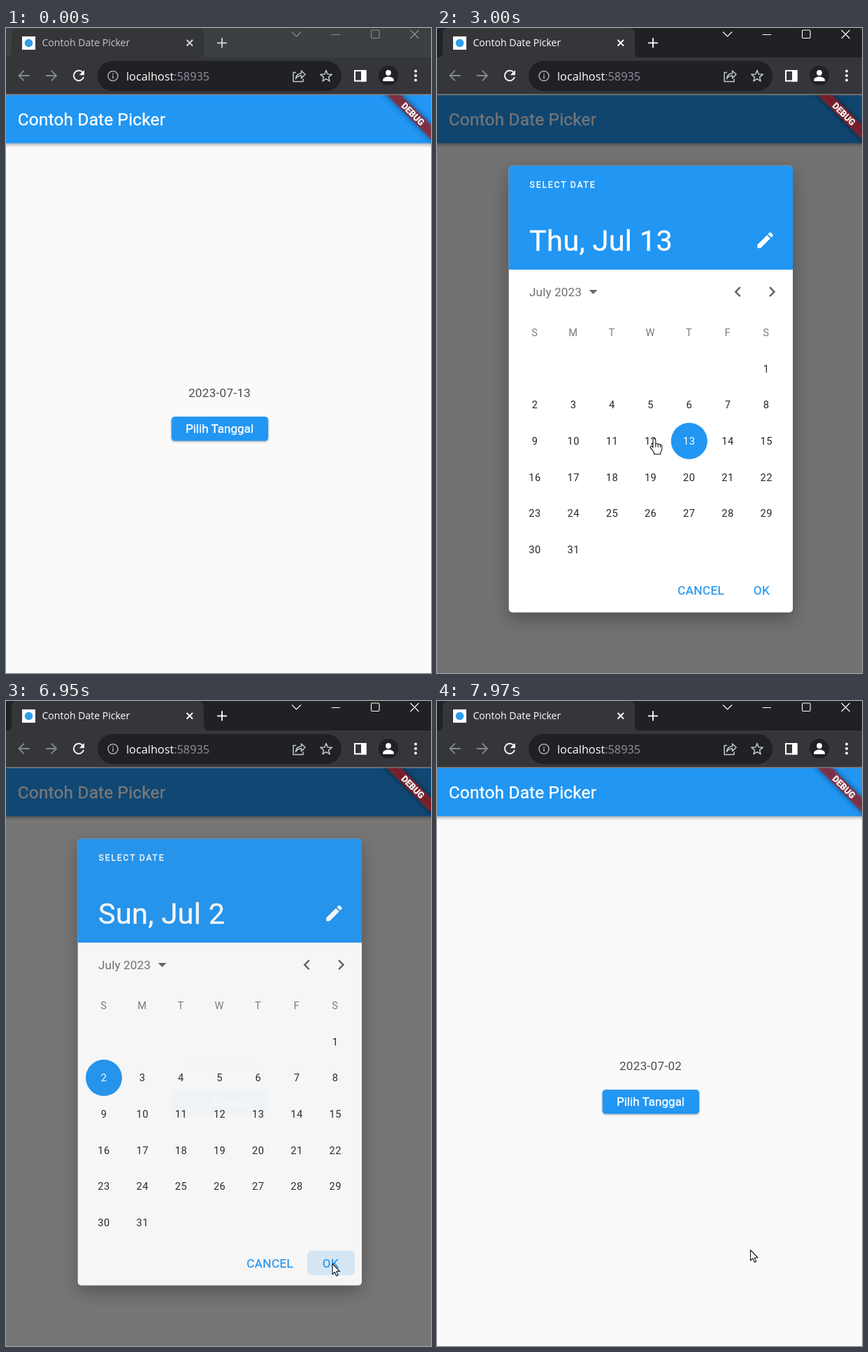
Write an HTML page that moves like this. It is 608 px wide and 921 px high and loops after 8 s.

```html
<!DOCTYPE html>
<html lang="id">
<head>
<meta charset="utf-8">
<title>Contoh Date Picker</title>
<style>
  html, body { margin: 0; width: 100%; height: 100%; overflow: hidden; background: #fafafa; }
  svg { display: block; width: 100%; height: 100%; }
  text { font-family: Roboto, sans-serif; font-size: 17.1px; white-space: pre; }
  .ui { font-family: "Open Sans", sans-serif; }
  .mid { text-anchor: middle; }
  .white { fill: #fff; stroke: #fff; stroke-width: .35; }
  .blue { fill: #2196f3; stroke: #2196f3; stroke-width: .25; }
  .line { fill: none; stroke-width: 1.8; }
  #days text { font-size: 14.6px; letter-spacing: .5px; }
  #week text { font-size: 14.6px; fill: #7c7c7c; }
  #appbar { filter: drop-shadow(0 2px 2.5px rgba(0,0,0,.35)); }
  #button { filter: drop-shadow(0 1.5px 1.5px rgba(0,0,0,.35)); }
  #card { filter: drop-shadow(0 9px 13px rgba(0,0,0,.3)); }
  #bandShade { filter: blur(4px); }
</style>
</head>
<body>
<svg viewBox="0 0 608 921" preserveAspectRatio="none">
  <defs><clipPath id="view"><rect y="95.5" width="608" height="826"/></clipPath></defs>

  <g id="page" clip-path="url(#view)">
    <rect y="95" width="608" height="826" fill="#fafafa"/>
    <rect id="appbar" x="-10" y="85" width="628" height="79.5" fill="#2196f3"/>
    <text class="white" x="16.8" y="139" style="font-size:24.4px" letter-spacing=".18">Contoh Date Picker</text>
    <text id="date" class="mid" x="305.6" y="527" fill="#4d4d4d" letter-spacing=".3">2023-07-13</text>
    <rect id="button" x="236.7" y="555" width="138.4" height="34.6" rx="4.8" fill="#2196f3"/>
    <text class="mid white" x="305.5" y="578.3">Pilih Tanggal</text>
  </g>

  <rect id="barrier" y="95.5" width="608" height="826" opacity="0"/>

  <g id="dialog">
    <rect id="card" x="102.7" y="196.7" width="406.3" height="637.8" rx="5" fill="#fff"/>
    <path d="M102.7 345V201.7a5 5 0 0 1 5-5H504a5 5 0 0 1 5 5V345z" fill="#2196f3"/>
    <text class="white" x="132.6" y="228" style="font-size:12.2px" letter-spacing="1.83">SELECT DATE</text>
    <text id="headline" class="white" x="132" y="318" style="font-size:41.5px" letter-spacing=".3">Thu, Jul 13</text>
    <path transform="translate(454.5 288) scale(1.25)" fill="#fff" d="M3 17.25V21h3.75L17.81 9.94l-3.75-3.75zM20.71 7.04a1 1 0 0 0 0-1.41l-2.34-2.34a1 1 0 0 0-1.41 0l-1.83 1.83 3.75 3.75z"/>
    <text x="132" y="383" fill="#707070" letter-spacing=".15">July 2023</text>
    <path d="M217.5 374h12l-6 6z" fill="#666"/>
    <g fill="#616161">
      <path transform="translate(415.7 362) scale(1.22)" d="M15.41 7.41 14 6l-6 6 6 6 1.41-1.41L10.83 12z"/>
      <path transform="translate(464.7 362) scale(1.22)" d="M10 6 8.59 7.41 13.17 12l-4.58 4.59L10 18l6-6z"/>
    </g>
    <g id="week"></g>
    <circle id="hover" r="30.5" fill-opacity=".08"/>
    <circle id="chosen" r="26" fill="#2196f3"/>
    <g id="days"></g>
    <rect id="okInk" x="431" y="785" width="68" height="35" rx="6" fill="#2196f3"/>
    <g class="mid blue" letter-spacing=".4">
      <text x="377.7" y="808.7">CANCEL</text>
      <text x="464.5" y="808.7">OK</text>
    </g>
  </g>

  <g clip-path="url(#view)">
    <g transform="translate(610 95) rotate(45)">
      <rect id="bandShade" x="-55" y="32" width="110" height="14.6" fill-opacity=".5"/>
      <rect x="-55" y="32" width="110" height="14.6" fill="#b71c1c" fill-opacity=".627"/>
      <text class="mid white" y="43.8" style="font-size:12.6px;font-weight:700">DEBUG</text>
    </g>
  </g>

  <g id="browser">
    <rect id="strip" width="608" height="43"/>
    <path d="M0 42.5q8 0 8-8V9q0-9 9-9H274q9 0 9 9V34.5q0 8 8 8z" fill="#35363a"/>
    <rect y="42" width="608" height="52.5" fill="#35363a"/>
    <rect y="94" width="608" height="1.6" fill="#6f655c"/>
    <rect x="23" y="12" width="19" height="19" fill="#fff"/>
    <circle cx="32.5" cy="21.5" r="5.8" fill="#2f9fea"/>
    <text id="tabName" class="ui" x="51.5" y="26.4" style="font-size:14.05px">Contoh Date Picker</text>
    <g id="tabIcons" class="line">
      <path d="M258.5 17l8.500 8.500m0-8.500-8.500 8.500M302 21.300h14M309 14.300v14"/>
    </g>
    <g id="winIcons" class="line" style="stroke-width:1.1">
      <path d="M409 5.500l6.500 6.500 6.500-6.500M465.500 9.500h12.500M578.500 3l12 12m0-12-12 12"/>
      <rect x="522.5" y="3" width="11.5" height="11.5" rx="1.5"/>
    </g>

    <rect x="131" y="47" width="349" height="43" rx="21.5" fill="#202124"/>
    <g class="line" stroke="#85888c">
      <path d="M33.500 68H18.500m7.300-7.300L18.500 68l7.300 7.300M57 68h15m-7.300-7.300L72 68l-7.300 7.300"/>
    </g>
    <path class="line" stroke="#f1f3f4" style="stroke-width:2" d="M109.500 63.200a7.200 7.200 0 1 0 1.500 6.800"/>
    <path d="M112 60v7.300h-7.300z" fill="#f1f3f4"/>
    <g class="line" stroke="#a5a9ae" style="stroke-width:1.6">
      <circle cx="153" cy="68.5" r="7"/>
      <path d="M153 67.500v4.700M153 64.500v1.700"/>
    </g>
    <text class="ui" x="172" y="74.5" style="font-size:16.3px" fill="#fff">localhost<tspan fill="#9390a0">:58935</tspan></text>
    <g class="line" stroke="#c4c7cb" style="stroke-width:1.5" stroke-linejoin="round">
      <path d="M415 63.500H411V76.500H425V72.500M414.500 72.500c.5-5 3.500-7.500 8-7.700V61l5.500 5.300-5.500 5.300V68c-3.500 0-6 1.200-8 4.500z"/>
      <path id="star"/>
    </g>
    <rect x="499" y="61" width="15.5" height="14.5" fill="none" stroke="#fff" stroke-width="2"/>
    <rect x="508" y="60" width="7.5" height="16.5" fill="#fff"/>
    <circle cx="547" cy="68" r="14" fill="#202124"/>
    <g fill="#fff">
      <circle cx="547" cy="64" r="3.9"/>
      <path d="M539.200 76v-2c0-3 4.500-4.500 7.800-4.500s7.800 1.500 7.800 4.500v2z"/>
      <circle cx="586" cy="61.5" r="2"/><circle cx="586" cy="68" r="2"/><circle cx="586" cy="74.5" r="2"/>
    </g>
  </g>

  <g id="cursor" fill="#fff" stroke="#15181f" stroke-width="1.1" stroke-linejoin="round">
    <path id="arrow" d="M.5 .5V15.500L3.900 12.400 6.200 18 8.600 17 6.300 11.500H11z"/>
    <path id="hand" d="M-2 13V2a1.900 1.900 0 0 1 3.800 0V8.200c.4-1.200 3.200-1 3.400.6.5-1 3-.8 3.200.8.6-.8 2.400-.4 2.400 1.400V15c0 2-1.600 3.600-2 5.500V22.500H-.5V20.500C-1 18.500-4 15.600-5.400 13.600c-1.400-1.800.8-3.600 2.200-2zM1.800 8.200V12.500M5.200 8.800V12.800M8.400 9.600V13"/>
  </g>
</svg>
<script>
const LOOP = 8000;
const $ = id => document.getElementById(id);
const set = (id, attrs) => {
  for (const k in attrs) $(id).setAttribute(k, attrs[k]);
};
const show = (id, on) => { $(id).style.display = on ? '' : 'none'; };

// Bursts of screen updates: start, end, number of steps.
const bursts = [
  [630, 1400, 12], [1470, 2010, 9], [2150, 2210, 2], [3000, 3080, 2], [3670, 4420, 12],
  [4480, 4750, 4], [5150, 5480, 5], [5740, 6480, 12], [6740, 7160, 7], [7420, 7970, 8]
];

// Pointer stops: time, x, y, ease-out power of the way there.
const stops = [
  [560, 496, 930, 1], [1400, 317, 602, 1.6], [1403, 317, 602, 1], [2010, 311, 586, 1.5],
  [3600, 311, 586, 1], [4420, 150, 546, 1.5], [4425, 150, 546, 1], [4750, 141, 540, 1.3],
  [5670, 141, 540, 1], [6010, 430, 741, 1.1], [6480, 466.5, 803, 2],
  [7345, 466.5, 803, 1], [7970, 448, 783.5, 1.4]
];

const colX = c => 140 + 55.2 * c;
const rowY = r => 486.5 + 51.6 * r;
const dayX = d => colX((d + 5) % 7);
const dayY = d => rowY(Math.floor((d + 5) / 7));

function label(parent, text, x, y) {
  const el = document.createElementNS('http://www.w3.org/2000/svg', 'text');
  el.textContent = text;
  el.setAttribute('class', 'mid');
  el.setAttribute('x', x);
  el.setAttribute('y', y);
  $(parent).append(el);
  return el;
}

[...'SMTWTFS'].forEach((s, c) => label('week', s, colX(c) - .5, 439.5));
const days = [];
for (let d = 1; d <= 31; d++) days[d] = label('days', d, dayX(d), dayY(d) + 5.2);

let star = '';
for (let i = 0; i < 10; i++) {
  const r = i % 2 ? 3.7 : 8.6, a = i * Math.PI / 5;
  star += (i ? 'L' : 'M') + (458 + r * Math.sin(a)) + ' ' + (69 - r * Math.cos(a));
}
set('star', { d: star + 'z' });

function snap(t) {
  let last = 0;
  for (const [a, b, n] of bursts) {
    if (t < a) break;
    const step = (b - a) / (n - 1);
    last = Math.min(b, a + Math.floor((t - a) / step + .001) * step);
  }
  return last;
}

function pointer(t) {
  const i = stops.findIndex(s => s[0] >= t);
  if (i < 1) return stops[i < 0 ? stops.length - 1 : 0].slice(1, 3);
  const [t0, x0, y0] = stops[i - 1], [t1, x1, y1, p] = stops[i];
  const e = 1 - (1 - (t - t0) / (t1 - t0)) ** p;
  return [x0 + (x1 - x0) * e, y0 + (y1 - y0) * e];
}

function dayAt(x, y) {
  const c = Math.round((x - 140) / 55.2), r = Math.round((y - 486.5) / 51.6);
  const d = r * 7 + c - 5;
  return c >= 0 && c < 7 && r >= 0 && d >= 1 && d <= 31 ? d : 0;
}

function draw(time) {
  const t = snap(time);
  const [x, y] = pointer(t);
  const open = t >= 3000 && t < 7160;
  const active = t >= 2150;
  const picked = t >= 5200 ? 2 : 13;

  // Browser window
  set('strip', { fill: active ? '#202124' : '#3c4043' });
  set('tabName', { fill: active ? '#fff' : '#c3c6ca' });
  set('tabIcons', { stroke: active ? '#fff' : '#d5d7da' });
  set('winIcons', { stroke: active ? '#fff' : '#8d9093' });

  // Page
  const onButton = t < 3000 && y < 590;
  $('date').textContent = t >= 6880 ? '2023-07-02' : '2023-07-13';
  set('button', { fill: onButton ? '#339ef4' : '#2196f3' });

  // Dialog
  const v = open ? Math.min(1, (7160 - t) / 280) : 0;
  set('barrier', { opacity: .54 * (1 - (1 - v) ** 2.56) });
  set('dialog', { opacity: 1 - (1 - v) ** 2 });
  show('dialog', open);
  $('headline').textContent = picked === 2 ? 'Sun, Jul 2' : 'Thu, Jul 13';
  set('chosen', { cx: dayX(picked), cy: dayY(picked) });
  const over = open && t < 6880 ? dayAt(x, y) : 0;
  show('hover', over && over !== picked && t >= 3080);
  if (over) set('hover', { cx: dayX(over), cy: dayY(over) });
  days.forEach((el, d) => {
    const fill = d === picked ? '#fff' : '#262626';
    el.setAttribute('fill', fill);
  });
  const onOk = open && x > 431 && y > 785;
  const press = Math.max(0, Math.min(1, (t - 6670) / 280));
  set('okInk', { opacity: onOk ? .04 + .12 * press : 0 });

  // Pointer
  const hand = onButton || over || (onOk && t < 6880);
  show('cursor', t >= 630);
  show('hand', hand);
  show('arrow', !hand);
  set('cursor', { transform: `translate(${x} ${y})` });
}

const start = performance.now();
function tick(now) {
  draw(Math.max(0, now - start) % LOOP);
  requestAnimationFrame(tick);
}
draw(0);
requestAnimationFrame(tick);
</script>
</body>
</html>
```
